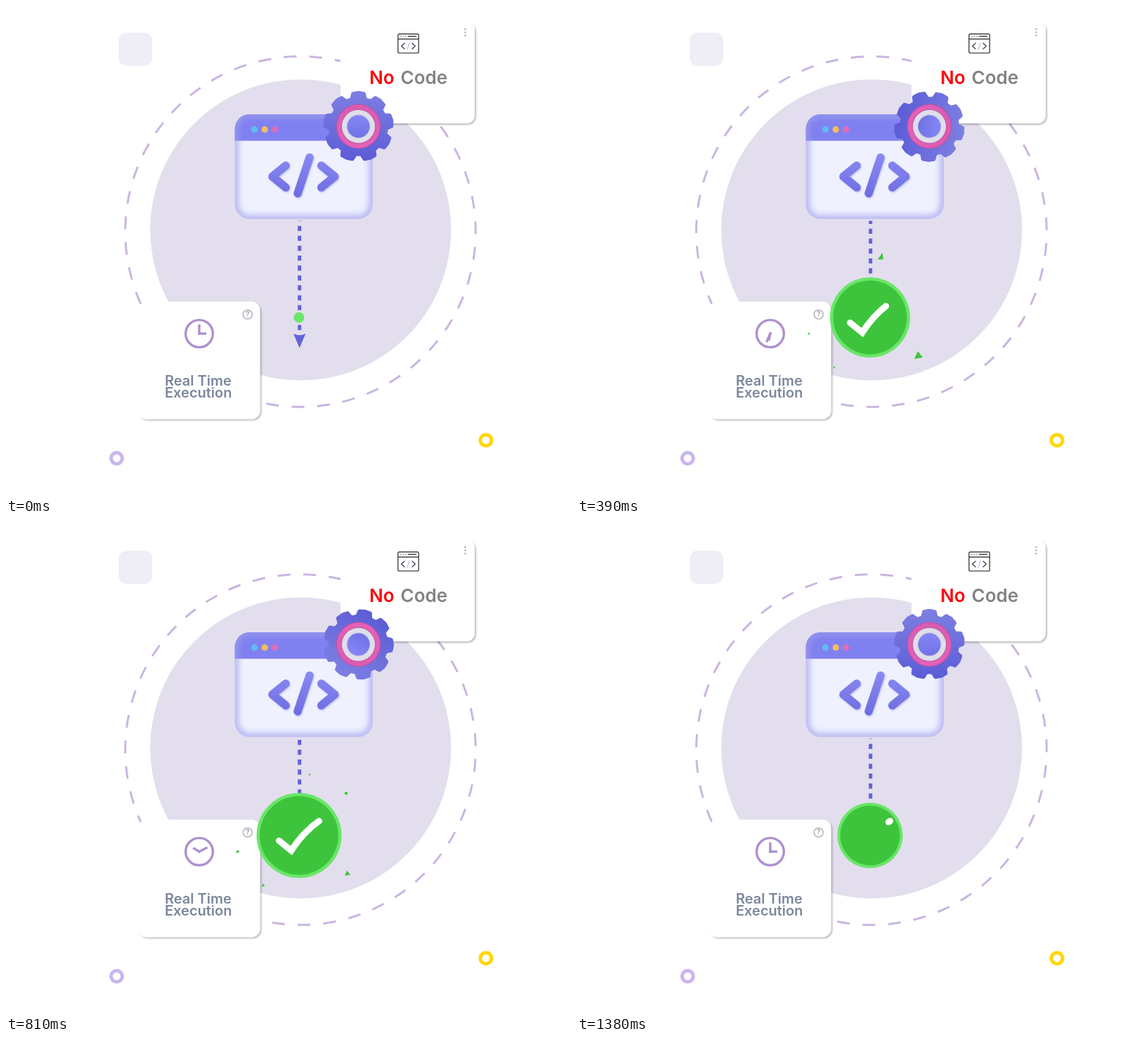
These frames come from a looping animation (804x697 px, 1410 ms). An HTML page:

```html
<!DOCTYPE html>
<html lang="en">
<head>
<meta charset="utf-8">
<title>No Code</title>
<style>
  html, body { margin: 0; width: 100%; height: 100%; overflow: hidden; background: #fff; }
  svg { display: block; width: 804px; height: 697px; font-family: Inter, sans-serif; font-weight: 600; }
  .line { fill: none; stroke-linecap: round; stroke-linejoin: round; }
</style>
</head>
<body>
<svg viewBox="0 0 804 697">
  <defs>
    <filter id="shadow" x="-10%" y="-10%" width="120%" height="120%">
      <feDropShadow dx="2" dy="2" stdDeviation="1.3" flood-color="#000" flood-opacity=".25"/>
    </filter>
    <filter id="blur" x="-20%" y="-20%" width="140%" height="140%"><feGaussianBlur stdDeviation="5"/></filter>
    <filter id="soft" x="-20%" y="-20%" width="140%" height="140%">
      <feDropShadow dx="1" dy="1.5" stdDeviation="1.2" flood-color="#5a5bc8" flood-opacity=".35"/>
    </filter>
    <clipPath id="frame"><rect x="325.5" y="154" width="196.5" height="149" rx="21"/></clipPath>
    <linearGradient id="glyph" gradientUnits="userSpaceOnUse" x1="0" y1="210" x2="0" y2="272">
      <stop stop-color="#8a8af4"/><stop offset="1" stop-color="#6c6ce0"/>
    </linearGradient>
    <linearGradient id="metal" gradientUnits="userSpaceOnUse" x1="0" y1="-50" x2="0" y2="50">
      <stop stop-color="#7e7fe2"/><stop offset="1" stop-color="#5b5cd6"/>
    </linearGradient>
    <linearGradient id="pink" x2="0" y2="1">
      <stop stop-color="#d95cb0"/><stop offset="1" stop-color="#e461b8"/>
    </linearGradient>
    <linearGradient id="ball" x2="0" y2="1">
      <stop stop-color="#8586f6"/><stop offset="1" stop-color="#7071e4"/>
    </linearGradient>
  </defs>

  <rect x="160.5" y="38" width="47.5" height="47" rx="11" fill="#efedf5"/>
  <circle cx="419.3" cy="318.5" r="214" fill="#e3deed"/>
  <circle id="ring" cx="419" cy="321" r="249.3" fill="none" stroke="#cab5e1" stroke-width="3"
    pathLength="86" stroke-dasharray="1 1"/>
  <g fill="none" stroke-width="5">
    <circle cx="157.5" cy="643.3" r="8" stroke="#c9b6ee"/>
    <circle cx="683" cy="617.7" r="8" stroke="#ffd60a"/>
  </g>

  <!-- No Code card -->
  <rect x="476" y="23" width="191" height="144" rx="12" fill="#fff" filter="url(#shadow)"/>
  <g class="line" stroke="#45454b" stroke-width="1.4">
    <rect x="557.8" y="39.7" width="29.4" height="27.2" rx="2"/>
    <path d="M558 47h29M572.5 43.3h11M567 53l-4.300 4 4.300 4M578 53l4.300 4-4.300 4"/>
    <path d="M562 43.3h0M565.500 43.3h0M569 43.3h0"/>
    <path d="M574.200 52.500l-3.200 9" stroke="#c9bde8"/>
  </g>
  <path class="line" d="M653.500 33v0M653.500 37.500v0M653.500 42v0" stroke="#a8a8a8" stroke-width="2.4"/>
  <g font-size="26">
    <text x="517" y="111" fill="#fb0207">No</text>
    <text x="561.5" y="111" fill="#838386">Code</text>
  </g>

  <!-- Real time card -->
  <rect x="188" y="420.5" width="173.5" height="167" rx="12" fill="#fff" filter="url(#shadow)"/>
  <circle cx="343.8" cy="438.8" r="6.500" fill="none" stroke="#b9b9c6" stroke-width="1.7"/>
  <text x="343.8" y="442.400" font-size="10" font-weight="700" fill="#a9a9b8" text-anchor="middle">?</text>
  <g transform="translate(275 466)" fill="none" stroke="#ae90cf" stroke-width="3.400">
    <circle r="19.400"/>
    <path id="minute" d="M0 0V-11.500" stroke-linecap="square"/>
    <path id="hour" d="M0 0V-8.500" stroke-linecap="square"/>
  </g>
  <g font-size="20" fill="#7c879b">
    <text x="226" y="540">Real Time</text>
    <text x="226" y="557">Execution</text>
  </g>

  <!-- Arrow -->
  <path id="flow" d="M417.700 305.500V467" stroke="#6364d8" stroke-width="5" stroke-dasharray="7.300 6.800"/>
  <path d="M409 466q8.700 4.500 17.400 0l-8.700 20.500z" fill="#6364d8"/>

  <!-- Browser window -->
  <g clip-path="url(#frame)">
    <rect x="325" y="154" width="198" height="150" fill="#eff1ff"/>
    <rect x="325" y="154" width="198" height="37.700" fill="#8081f1"/>
    <rect x="325.500" y="154" width="196.500" height="149" rx="21" fill="none" stroke="#9c9dea"
      stroke-width="9" opacity=".85" filter="url(#blur)"/>
  </g>
  <circle cx="353.500" cy="175.700" r="4.600" fill="#5fbcf0"/>
  <circle cx="368.200" cy="175.700" r="4.600" fill="#f4bd62"/>
  <circle cx="382.800" cy="175.700" r="4.600" fill="#df6cbc"/>
  <path class="line" d="M398 227l-19 15.500L398 258M448.700 227l19 15.500L448.700 258M432 215.500L415 266.500"
    stroke="url(#glyph)" stroke-width="11.500" filter="url(#soft)"/>

  <g id="gear">
    <path id="teeth" fill="url(#metal)" stroke="url(#metal)" stroke-width="5" stroke-linejoin="round"/>
    <circle r="31.700" fill="#c94aa0"/>
    <circle r="30.700" fill="url(#pink)"/>
    <circle r="24.500" fill="#c558a6"/>
    <circle r="23.500" fill="#dfdeea"/>
    <circle r="17" fill="#c9c9e2"/>
    <circle r="16" fill="url(#ball)"/>
  </g>

  <!-- Success badge -->
  <circle id="rim" cx="417" cy="443" fill="#69e668"/>
  <circle id="disc" cx="417" cy="443" fill="#3ec43c"/>
  <path id="check" d="M388.500 450.500L406 464.500Q423 438 445.500 422.500" fill="none" stroke="#fff"
    stroke-width="9" stroke-linecap="round" pathLength="1"/>
  <g id="confetti" fill="#3ec43c"></g>
</svg>
<script>
const STEP = 30, STEPS = 47, LOOP = STEP * STEPS;
const $ = id => document.getElementById(id);
const set = (id, attrs) => { for (const a in attrs) $(id).setAttribute(a, attrs[a]); };
const ramp = (x, a, b) => {
  const u = Math.min(1, Math.max(0, (x - a) / (b - a)));
  return u * u * (3 - 2 * u);
};
// Linear interpolation through [time, value] keys
const track = (x, keys) => {
  const i = Math.max(1, keys.findIndex(key => key[0] >= x));
  const [[a, from], [b, to]] = [keys[i - 1], keys[i]];
  return from + (to - from) * (x - a) / (b - a);
};

const polar = (r, deg) => {
  const a = deg * Math.PI / 180;
  return [r * Math.sin(a), -r * Math.cos(a)].map(v => v.toFixed(2)).join(' ');
};
const outline = [];
for (let tooth = 0; tooth < 360; tooth += 40)
  outline.push(polar(40, tooth - 14), polar(47.3, tooth - 9.5), polar(48, tooth),
    polar(47.3, tooth + 9.5), polar(40, tooth + 14));
set('teeth', { d: 'M' + outline.join('L') + 'z' });

const dot = r => `M${-r} 0a${r} ${r} 0 1 0 ${2 * r} 0a${r} ${r} 0 1 0 ${-2 * r} 0`;
const bits = [
  { x: 432, y: 356, d: 'M-4 4.500L2.500-5 4 4.500z', show: 8, hide: 24 },
  { x: 486, y: 497, d: 'M-6 5L-1-6 6 3z', show: 8, hide: 25 },
  { x: 330, y: 466, d: 'M-2-3.500L5 0-4 4z', show: 11, hide: 25 },
  { x: 366, y: 514, d: dot(2.8), show: 11, hide: 25 },
  { x: 484, y: 383, d: dot(2.2), show: 15, hide: 31 },
];
for (const bit of bits) {
  bit.node = document.createElementNS('http://www.w3.org/2000/svg', 'path');
  bit.node.setAttribute('d', bit.d);
  $('confetti').append(bit.node);
}

const rimSize = [[0, 7.5], [5, 57.5], [8, 62], [13, 57], [18, 60.5], [41, 60.5], [44, 56], [46, 46.5]];
const discSize = [[0, 0], [5, 52.5], [8, 57], [13, 52.5], [18, 56], [41, 56], [44, 51.5], [46, 42.5]];

function draw(now) {
  const k = Math.floor(now % LOOP / STEP), p = k / (STEPS - 1);
  set('ring', { transform: `rotate(${5 + p * 3 * 360 / 43} 419 321)` });
  set('minute', { transform: `rotate(${720 * p})` });
  set('hour', { transform: `rotate(${90 + 360 * p})` });
  set('gear', { transform: `translate(501.500 171.300) rotate(${360 * p})` });
  set('flow', { 'stroke-dashoffset': -7.2 - 14.1 * p });
  set('rim', { r: track(k, rimSize) });
  set('disc', { r: track(k, discSize) });

  const start = ramp(k, 38, 47), end = ramp(k, 4.3, 15);
  set('check', {
    'stroke-dasharray': `${end - start} 2`,
    'stroke-dashoffset': -start,
    visibility: end > start ? 'visible' : 'hidden',
  });
  for (const { node, x, y, show, hide } of bits) {
    const scale = ramp(k, show, show + 4.5) * (1 - ramp(k, hide, hide + 5));
    node.setAttribute('transform', `translate(${x} ${y}) scale(${scale})`);
  }
}

const origin = performance.now();
(function tick() {
  draw(performance.now() - origin);
  requestAnimationFrame(tick);
})();
</script>
</body>
</html>
```
